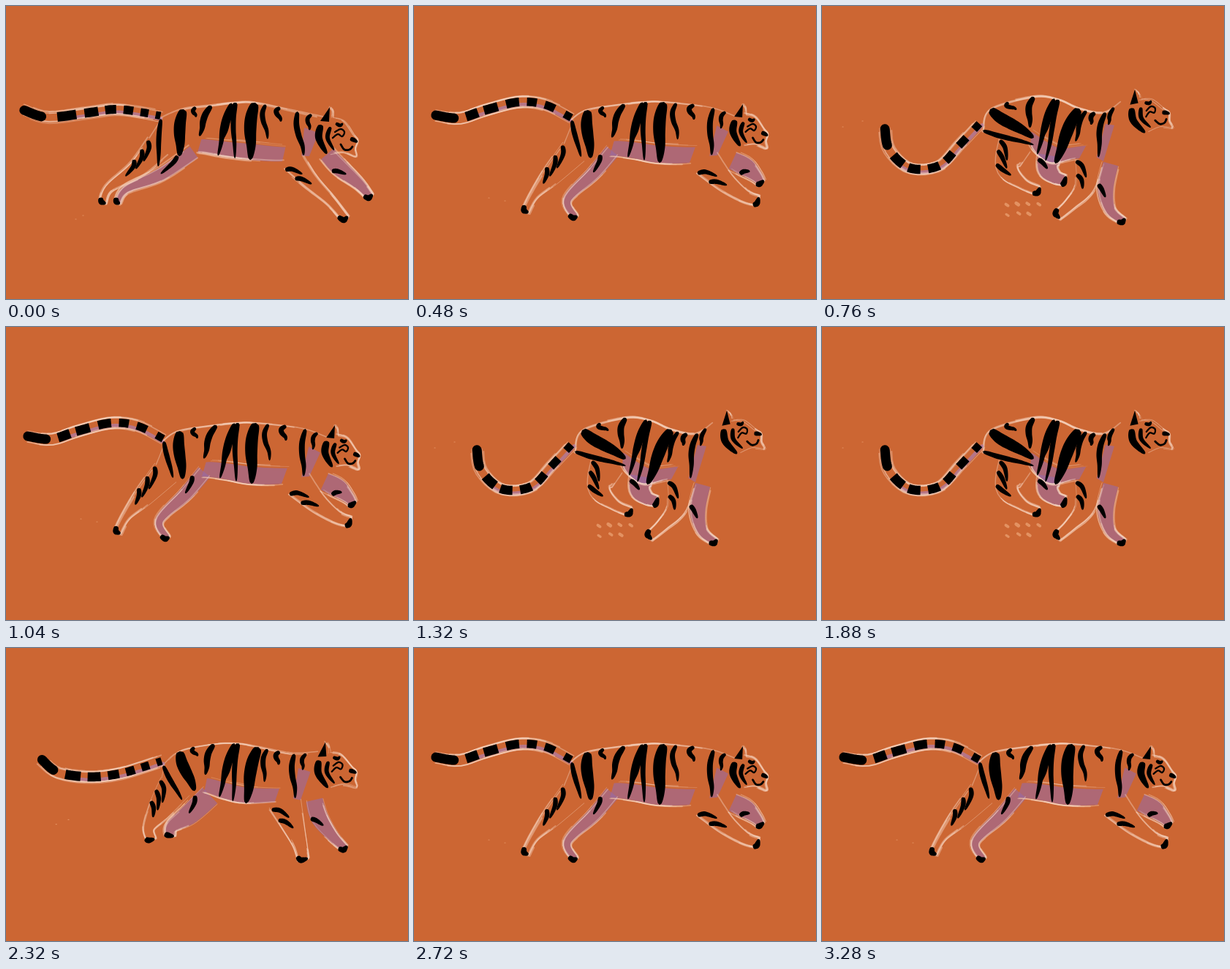
An HTML page with a canvas that plays this animation: 550x400 px, repeating every 3.36 s.

```html
<!DOCTYPE html>
<html lang="en">
<head>
<meta charset="utf-8">
<title>Running tiger</title>
<style>
html, body { margin: 0; width: 100%; height: 100%; overflow: hidden; background: #cc6633; }
canvas { display: block; }
</style>
</head>
<body>
<canvas id="stage" width="550" height="400"></canvas>
<script>
const ctx = document.getElementById("stage").getContext("2d");
const STRIDE = 560, POSES = 8, TICK = 40;

// Key points by time in the stride: stretched, gathered, (landing,) pushing off.
const RIG = {
  tail: {
    0: "24 142 57 152 110 146 150 141 185 145 212 150",
    200: "86 167 92 196 120 221 160 218 188 190 216 160",
    480: "29 149 62 153 98 142 143 131 180 135 216 153"
  },
  back: {
    0: "212 154 243 141 281 136 315 132 341 132 394 143 436 152",
    200: "220 170 230 141 290 124 324 128 352 140 385 146 410 130",
    480: "216 156 238 142 288 134 318 131 342 131 405 138 440 150"
  },
  belly: {
    0: "207 220 235 206 262 200 298 206 331 210 378 212 415 205",
    200: "290 190 290 180 285 190 298 206 317 215 352 208 385 212",
    480: "228 206 240 208 268 204 300 208 333 214 377 214 415 204"
  },
  // Ear tip, then tilt in degrees and scale.
  head: { 0: "443 138 0 1", 200: "428 114 -17 .95", 480: "450 134 0 .9" },
  farHind: {
    0: "262 196 212 230 165 250 153 268",
    200: "312 202 310 222 320 234 332 238",
    360: "300 195 320 232 338 262 348 288",
    480: "274 195 246 228 210 264 220 288"
  },
  farFore: {
    0: "438 200 456 220 482 242 498 260",
    200: "396 212 388 248 394 278 412 293",
    480: "434 210 454 220 468 232 475 241"
  },
  nearHind: {
    0: "212 188 180 222 142 248 133 268",
    200: "265 185 254 220 274 242 296 252",
    360: "256 185 262 232 292 262 306 288",
    480: "222 195 188 232 165 258 153 280"
  },
  nearFore: {
    0: "391 210 415 238 444 266 464 290",
    200: "366 208 360 246 340 270 322 286",
    480: "398 212 425 240 452 260 470 266"
  },
  specks: { 0: "95 291 105 286", 200: "28 165 55 157", 480: "102 262 124 266" }
};
// Widths from hip to paw, and where stripes cross the leg.
const LEGS = {
  farHind: { widths: [24, 22, 14, 11], marks: [.5], far: true },
  farFore: { widths: [18, 19, 13, 9], marks: [.9], far: true },
  nearHind: { widths: [40, 27, 13, 11], marks: [.25, .55, .9] },
  nearFore: { widths: [36, 24, 15, 12], marks: [.2, .65] }
};
// Place along the back, lean, length down the flank, width.
const STRIPES = [
  [0, 0, 1, 7], [1, 0, 1, 16], [1.45, 0, .22, 6], [2, -.2, .65, 9],
  [2.8, -.1, 1, 8], [3, -.3, .7, 9], [3, .4, 1, 7], [4, 0, 1, 17],
  [4.3, .1, .6, 7], [4.65, 0, .25, 7], [5.1, .5, .95, 8], [5.5, 0, .35, 6]
];
// Relative to the ear tip.
const FACE = {
  ear: "-13 19 0 0 -1 20",
  earLine: "0 0 4 6 4 15",
  profile: "4 15 19 20 32 38 38 46 35 57 36 68 19 62 1 64",
  cheek: "-12 24 -15 42 -4 64",
  jaw: "1 27 -3 42 6 59",
  nose: "28 43 33 45 38 48",
  brow: "8 22 14 25 18 22",
  eye: "7 34 15 30 20 34 17 40 11 37 4 42",
  mouth: "15 51 20 58 27 58 31 54"
};

let seed = 1;
const random = () => (seed = seed * 16807 % 2147483647) / 2147483647;
const jitter = size => (random() - .5) * size;

const parse = text => {
  const n = text.split(" ").map(Number);
  return n.filter((_, i) => i % 2 === 0).map((x, i) => [x, n[2 * i + 1]]);
};
const mix = ([ax, ay], [bx, by], t) => [ax + (bx - ax) * t, ay + (by - ay) * t];

function keyed(track, time) {
  const times = Object.keys(track).map(Number);
  const next = times.find(k => k > time) ?? times[times.length - 1];
  const prev = times.filter(k => k <= time).pop();
  const t = next === prev ? 0 : (time - prev) / (next - prev);
  const to = parse(track[next]);
  return parse(track[prev]).map((p, i) => mix(p, to[i], t));
}

// Point u on a Catmull-Rom curve; whole numbers are the key points.
function at(p, u) {
  const i = Math.max(0, Math.min(p.length - 2, Math.floor(u))), t = u - i;
  const q = [-1, 0, 1, 2].map(k => p[Math.max(0, Math.min(p.length - 1, i + k))]);
  return [0, 1].map(k => {
    const [a, b, c, d] = q.map(v => v[k]);
    return b + t / 2 * (c - a + t * (2 * a - 5 * b + 4 * c - d + t * (3 * (b - c) + d - a)));
  });
}

function sample(from, to, point, steps = 24) {
  return Array.from({ length: steps + 1 }, (_, i) => point(from + (to - from) * i / steps));
}
const curve = p => sample(0, p.length - 1, u => at(p, u), 8 * p.length);

// A point beside the curve; positive distances lie to the right of its direction.
function beside(p, u, distance) {
  const [x, y] = at(p, u), a = at(p, u - .02), b = at(p, u + .02);
  const k = distance / (Math.hypot(b[0] - a[0], b[1] - a[1]) || 1);
  return [x + (a[1] - b[1]) * k, y + (b[0] - a[0]) * k];
}

function trace(points) {
  ctx.beginPath();
  points.forEach(([x, y]) => ctx.lineTo(x, y));
}

function fill(points, color = "#000") {
  trace(points);
  ctx.fillStyle = color;
  ctx.fill();
}

function stroke(points, width, color = "#000", cap = "round") {
  trace(points);
  Object.assign(ctx, { lineWidth: width, strokeStyle: color, lineCap: cap, lineJoin: "round" });
  ctx.stroke();
}

const shade = points => fill(points, "rgba(150,106,172,.55)");
const glow = (points, width) => stroke(points, width, "rgba(165,130,205,.55)");

// Loose, partial passes look like chalk.
function sketch(points, width = 1.8) {
  for (let pass = 0; pass < 6; pass++) {
    const start = [jitter(4), jitter(4)], end = [jitter(4), jitter(4)], n = points.length;
    const loose = points.map(([x, y], i) => {
      const [dx, dy] = mix(start, end, i / n);
      return [x + dx, y + dy];
    });
    const part = loose.slice(pass && random() * n * .4, n - (pass && random() * n * .4));
    stroke(part, width * (.4 + random() * .8), "rgba(247,216,194,.4)");
  }
}

// A tapered stroke, broadest before the middle.
function brush(p, width) {
  const end = p.length - 1;
  const side = sign => sample(0, 1, s =>
    beside(p, s * end, sign * width / 2 * Math.sqrt(Math.max(0, Math.sin(Math.PI * s ** .7)))));
  fill([...side(1), ...side(-1).reverse()]);
}

function makeLeg(joints, { widths, marks, far }) {
  const length = joints.slice(1).reduce((sum, [x, y], i) =>
    sum + Math.hypot(x - joints[i][0], y - joints[i][1]), 0);
  const squash = Math.max(.8, Math.min(1.35, 105 / length));
  const sizes = widths.map(w => [w / 2 * squash, 0]);
  const edge = (u, side) => beside(joints, u, side * at(sizes, u)[0]);
  const outline = [...sample(.15, 3, u => edge(u, 1)), at(joints, 3.15), ...sample(3, .15, u => edge(u, -1))];
  return {
    edge,
    shade: () => far && shade(outline),
    line: () => sketch(outline),
    ink() {
      for (const u of marks) brush([edge(u, .95), edge(u + .15, .5), edge(u + .5, .1)], 6.5);
      brush([edge(2.65, 1), edge(3, .6), at(joints, 3.05), edge(3, -.8)], 8);
    }
  };
}

function drawHead(head) {
  const [[x, y], [tilt, scale]] = head;
  const angle = tilt * Math.PI / 180, c = Math.cos(angle) * scale, s = Math.sin(angle) * scale;
  const part = name => parse(FACE[name]).map(([px, py]) => [x + px * c - py * s, y + px * s + py * c]);
  sketch(curve(part("profile")));
  sketch(curve(part("earLine")), 1.4);
  fill(part("ear"));
  brush(part("cheek"), 10);
  brush(part("jaw"), 6);
  brush(part("nose"), 6);
  brush(part("brow"), 5);
  stroke(curve(part("eye")), 2.3);
  stroke(curve(part("mouth")), 2.8);
}

function drawTail(tail) {
  glow(sample(1.4, 5, u => beside(tail, u, 4)), 5);
  for (const side of [-1, 1]) sketch(sample(0, 5, u => beside(tail, u, side * 7)));
  stroke(sample(.05, .8, u => at(tail, u)), 13);
  for (let band = 0; band < 6; band++) {
    const u = 1.5 + band * .66, half = .23 - band * .015;
    stroke(sample(u - half, u + half, v => at(tail, v), 6), 13 - band * .5, "#000", "butt");
  }
}

function drawDust(specks, gathered) {
  const color = "rgba(240,170,125,.65)";
  for (const [x, y] of specks) stroke([[x, y], [x + 1, y]], 1.2, color);
  for (let i = 0; gathered && i < 7; i++) {
    const x = 254 + i % 4 * 14 + jitter(5), y = (i < 4 ? 270 : 285) + jitter(6);
    stroke([[x, y], [x + 3, y + 2]], 3 + random() * 2, color);
  }
}

function render(time) {
  const rig = {};
  for (const name in RIG) rig[name] = keyed(RIG[name], time);
  const { back, belly } = rig;
  const flank = (u, v) => mix(at(back, u), at(belly, u), v);
  const legs = {};
  for (const name in LEGS) legs[name] = makeLeg(rig[name], LEGS[name]);
  const each = step => Object.values(legs).forEach(leg => leg[step]());

  seed = 101 + time;
  ctx.fillStyle = "#cc6633";
  ctx.fillRect(0, 0, 550, 400);
  drawDust(rig.specks, time === 200);

  each("shade");
  shade([...sample(2, 5, u => flank(u, .72)), ...sample(5, 2, u => flank(u, 1))]);
  shade([flank(5.4, .3), flank(6, .4), flank(6, 1), flank(5.6, .95)]);

  sketch(curve(back), 2);
  sketch(sample(2, 5, u => at(belly, u)));
  sketch([at(back, 0), legs.nearHind.edge(.15, 1)]);
  sketch(sample(2.2, 5, u => flank(u, .68)), .6);
  each("line");
  drawTail(rig.tail);

  for (const [u, lean, length, width] of STRIPES) {
    const bend = s => flank(u + lean * s - .08 * Math.sin(5 * s), length * s);
    brush(sample(0, 1, bend, 4), width);
  }
  each("ink");
  drawHead(rig.head);
}

// Evenly spaced poses, held to the nearest tick.
const starts = Array.from({ length: POSES }, (_, i) => Math.round(i * STRIDE / POSES / TICK) * TICK);
const begin = performance.now();
let shown = -1;
function tick() {
  const time = (performance.now() - begin) % STRIDE;
  const start = starts.filter(s => s <= time).pop();
  if (start !== shown) render(shown = start);
  requestAnimationFrame(tick);
}
tick();
</script>
</body>
</html>
```
